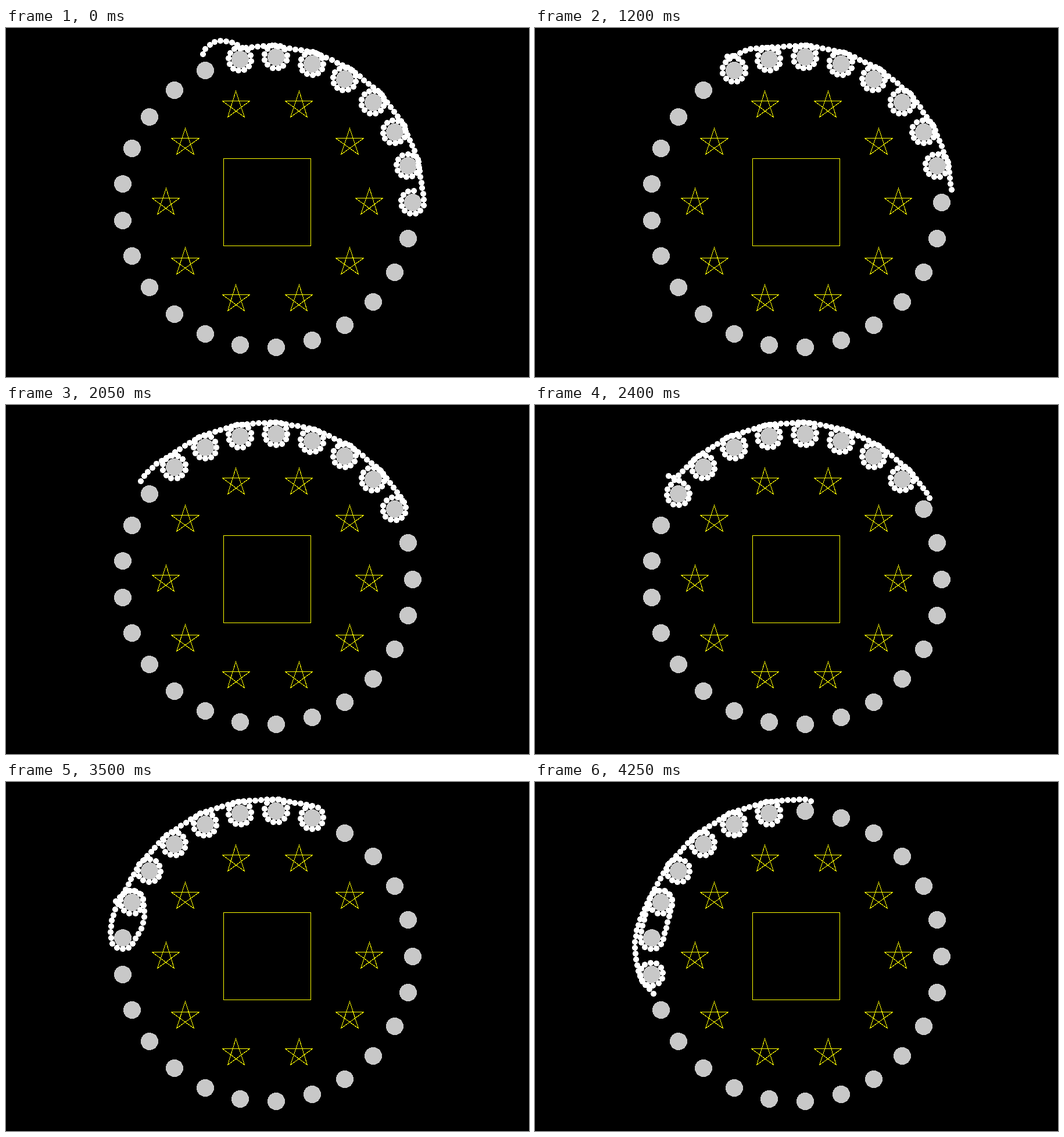
Write an HTML page that moves like this. It is 900x600 px and loops after 4300 ms.

```html
<!DOCTYPE html>
<html lang="en">
<head>
<meta charset="utf-8">
<title>Rope and pegs</title>
<style>
  html, body { margin: 0; width: 100%; height: 100%; overflow: hidden; background: #000; }
  svg { display: block; width: 900px; height: 600px; }
</style>
</head>
<body>
<svg id="stage" viewBox="0 0 900 600" shape-rendering="crispEdges"></svg>
<script>
const STEP = 50, FRAMES = 86, SUBSTEPS = 8;
const CENTER = { x: 450, y: 300 };
const LINK = 10, WRAP = 20;
const RAD = Math.PI / 180;
const stage = document.getElementById('stage');

function add(name, attrs) {
  const node = document.createElementNS('http://www.w3.org/2000/svg', name);
  for (const key in attrs) node.setAttribute(key, attrs[key]);
  return stage.appendChild(node);
}

// Angles are in degrees, counterclockwise on screen.
const polar = (c, r, deg) => ({ x: c.x + r * Math.cos(deg * RAD), y: c.y - r * Math.sin(deg * RAD) });
const floored = p => ({ x: Math.floor(p.x + 1e-6), y: Math.floor(p.y + 1e-6) });

const pegs = Array.from({ length: 25 }, (_, k) => floored(polar(CENTER, 250, k * 14.4)));

function drawScene() {
  const line = { fill: 'none', stroke: '#ff0', 'stroke-width': 1 };
  add('rect', { x: 374.5, y: 224.5, width: 150, height: 150, ...line });
  for (let k = 0; k < 10; k++) {
    const c = polar(CENTER, 175, k * 36);
    const points = [0, 1, 2, 3, 4].map(i => {
      const p = polar(c, 25, 90 + i * 144);
      return `${Math.floor(p.x) + 0.5},${Math.floor(p.y) + 0.5}`;
    });
    add('polygon', { points: points.join(' '), ...line });
  }
  for (const p of pegs) add('circle', { cx: p.x, cy: p.y, r: 15, fill: '#c8c8c8' });
}

// Rope at the start: one full turn around each of eight pegs, then a loose end.
function initialRope() {
  const path = [];
  const exit = k => 7.2 + 14.4 * k;
  for (let k = 0; k < 8; k++) {
    const from = k ? exit(k - 1) : 78;
    const to = 360 + (k < 7 ? exit(k) : 80);
    for (let a = from; a <= to; a++) path.push(polar(pegs[k], WRAP, a));
  }
  const bezier = (a, b, c, d, t) => {
    const u = 1 - t;
    return u * u * u * a + 3 * u * u * t * b + 3 * u * t * t * c + t * t * t * d;
  };
  for (let i = 1; i <= 100; i++) {
    const t = i / 100;
    path.push({ x: bezier(407, 385, 352, 339, t), y: bezier(34, 19, 15, 45, t) });
  }
  path.reverse();
  let last = path[0];
  const rope = [{ ...last }];
  for (const p of path) {
    let d;
    while ((d = Math.hypot(p.x - last.x, p.y - last.y)) >= LINK) {
      last = { x: last.x + (p.x - last.x) * LINK / d, y: last.y + (p.y - last.y) * LINK / d };
      rope.push({ ...last });
    }
  }
  return rope;
}

// Route of the leading end: [step, x, y].
const route = [
  [0, 339, 45], [11, 339, 51], [14, 322, 68], [16, 329, 92], [18, 348, 95],
  [20, 365, 84], [22, 365, 64], [23, 351, 47], [24, 331, 49],
  [26, 297, 66], [28, 269, 97], [30, 282, 136], [32, 330, 146], [34, 336, 116],
  [36, 308, 80], [39, 262, 96], [42, 225, 150], [44, 248, 180], [46, 274, 152], [48, 230, 122],
  [50, 206, 165], [52, 196, 207], [54, 222, 232], [56, 244, 205], [58, 214, 178],
  [60, 170, 222], [62, 161, 280],
  [64, 180, 311], [66, 228, 292], [68, 246, 220], [69, 224, 181], [70, 189, 205],
  [72, 161, 262], [74, 170, 325], [76, 203, 357], [78, 232, 332], [80, 211, 300],
  [82, 176, 320], [85, 204, 364]
];

function slope(i, axis) {
  const a = route[Math.max(i - 1, 0)], b = route[Math.min(i + 1, route.length - 1)];
  return (b[axis] - a[axis]) / (b[0] - a[0]);
}

function headAt(time) {
  let i = 0;
  while (i < route.length - 2 && route[i + 1][0] <= time) i++;
  const a = route[i], b = route[i + 1], span = b[0] - a[0];
  const t = (time - a[0]) / span, t2 = t * t, t3 = t2 * t;
  const at = axis => (2 * t3 - 3 * t2 + 1) * a[axis] + (3 * t2 - 2 * t3) * b[axis]
    + span * ((t3 - 2 * t2 + t) * slope(i, axis) + (t3 - t2) * slope(i + 1, axis));
  return { x: at(1), y: at(2) };
}

// Every link is dragged by the one before it and kept outside the pegs.
function pull(rope, head) {
  Object.assign(rope[0], head);
  for (let i = 1; i < rope.length; i++) {
    const p = rope[i], lead = rope[i - 1];
    const dx = p.x - lead.x, dy = p.y - lead.y, d = Math.hypot(dx, dy);
    if (d > LINK) {
      p.x = lead.x + dx * LINK / d;
      p.y = lead.y + dy * LINK / d;
    }
    for (const peg of pegs) {
      const px = p.x - peg.x, py = p.y - peg.y, r = Math.hypot(px, py);
      if (r > 0 && r < WRAP) {
        p.x = peg.x + px * WRAP / r;
        p.y = peg.y + py * WRAP / r;
      }
    }
  }
}

function simulate() {
  const rope = initialRope();
  const poses = [rope.map(floored)];
  for (let f = 1; f < FRAMES; f++) {
    for (let s = 1; s <= SUBSTEPS; s++) pull(rope, headAt(f - 1 + s / SUBSTEPS));
    poses.push(rope.map(floored));
  }
  return poses;
}

drawScene();
const poses = simulate();
const beads = poses[0].map(() => add('circle', { r: 5, fill: '#fff' }));

function render(ms) {
  const pose = poses[Math.floor(ms / STEP) % FRAMES];
  beads.forEach((bead, i) => {
    bead.setAttribute('cx', pose[i].x);
    bead.setAttribute('cy', pose[i].y);
  });
}

const start = performance.now();
function tick() {
  render(performance.now() - start);
  requestAnimationFrame(tick);
}
tick();
</script>
</body>
</html>
```
